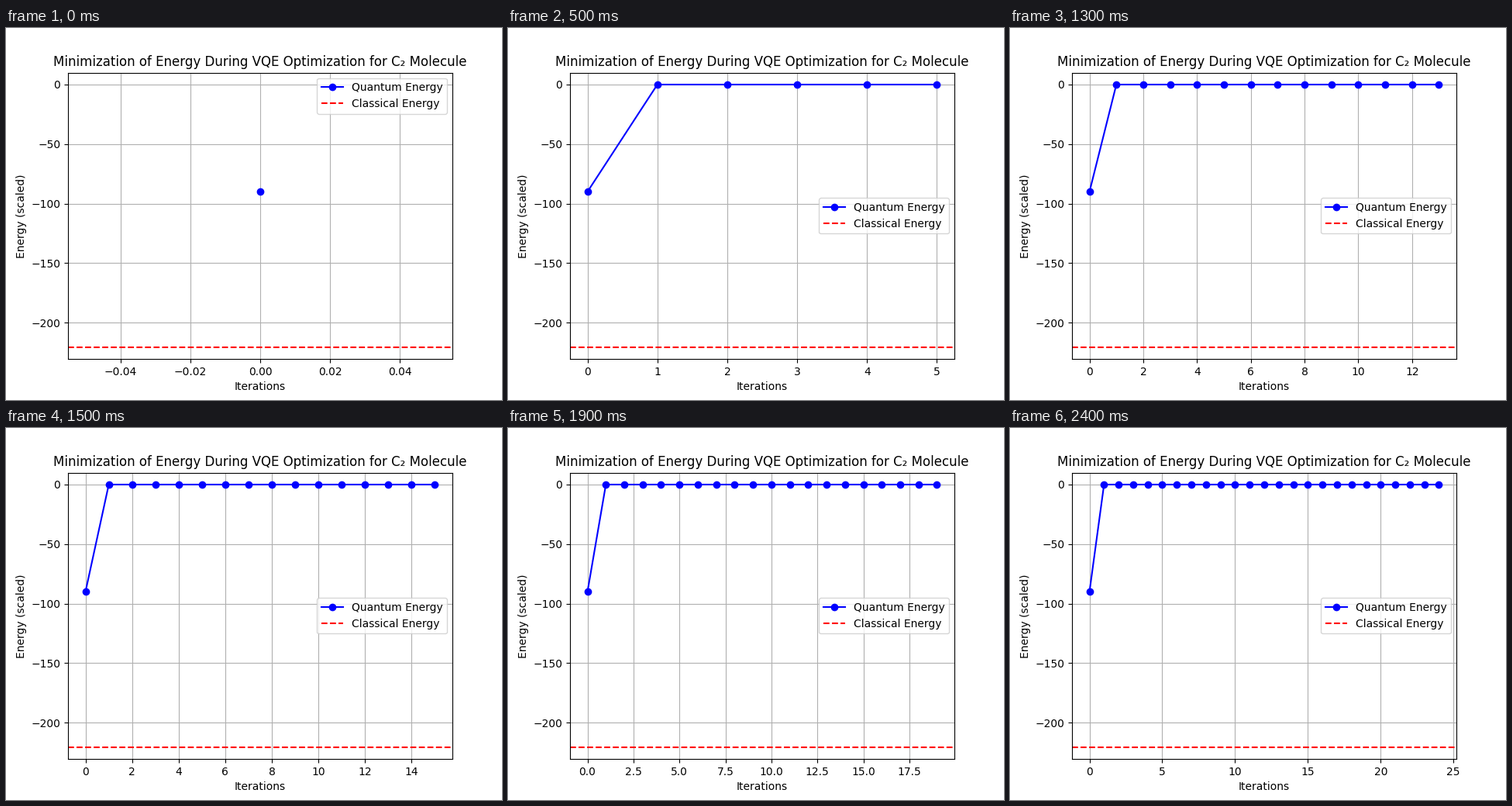
Recreate the animation shown at these times as a matplotlib script. Size 640 px wide and 480 px high, loop 2500 ms.

```python
import matplotlib.pyplot as plt
import numpy as np
from matplotlib.animation import FuncAnimation

STEPS = 25
INTERVAL = 100
CLASSICAL = -220.5

energy = np.zeros(STEPS)
energy[0] = -90

fig, ax = plt.subplots(figsize=(6.4, 4.8), dpi=100)


def update(i):
    """Plot the energies up to iteration i; x limits and legend adapt."""
    ax.clear()
    ax.plot(range(i + 1), energy[:i + 1], "o-", color="blue",
            label="Quantum Energy")
    ax.axhline(CLASSICAL, color="red", linestyle="--",
               label="Classical Energy")
    ax.set_ylim(CLASSICAL - 10, 10)
    ax.set_title("Minimization of Energy During VQE Optimization for C₂ Molecule")
    ax.set_xlabel("Iterations")
    ax.set_ylabel("Energy (scaled)")
    ax.grid(True)
    ax.legend(loc="best")
    return ax.get_children()


anim = FuncAnimation(fig, update, frames=STEPS, interval=INTERVAL,
                     repeat=True, repeat_delay=0, blit=False)
plt.show()
```
